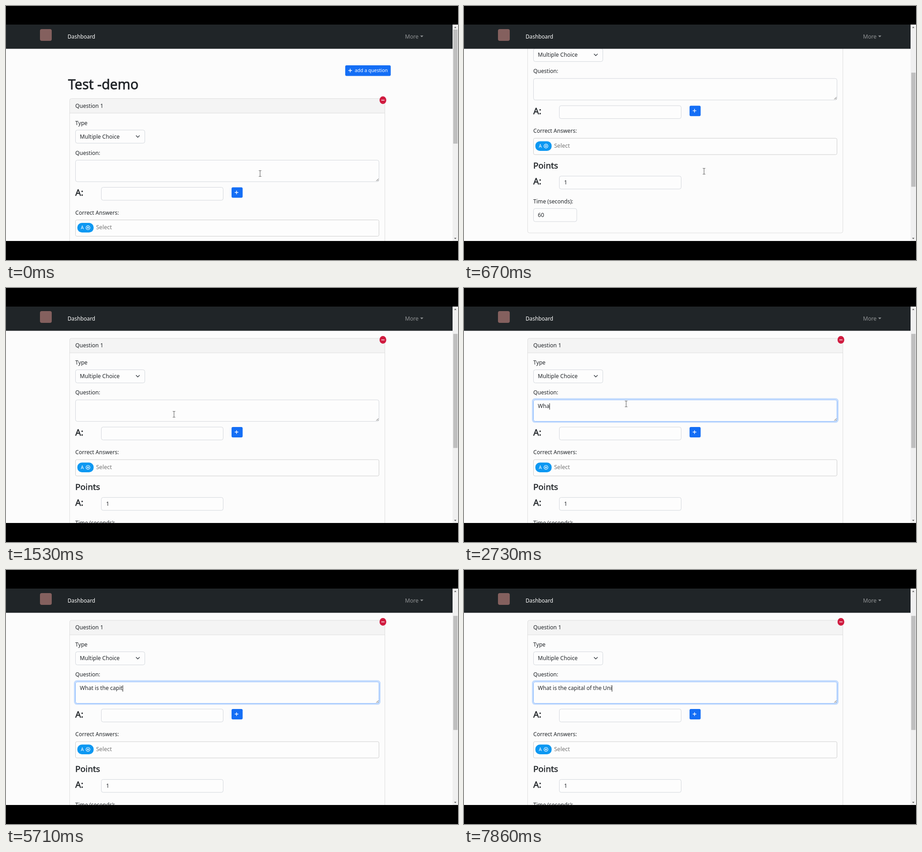
Animation, 998 px wide and 561 px high, one loop 8000 ms. Source, as an HTML page:

```html
<!DOCTYPE html>
<html lang="en">
<head>
<meta charset="utf-8">
<title>Question editor</title>
<style>
  html, body { margin: 0; height: 100%; overflow: hidden; background: #000; }
  svg { display: block; width: 100%; height: 100%; }
  text { font: 12.1px "Noto Sans", "Open Sans", sans-serif; fill: #212529; white-space: pre; }
  .title { font-size: 30px; stroke: #212529; stroke-width: .75; }
  .heading { font-size: 18.7px; stroke: #212529; stroke-width: .5; }
  .letter { font-size: 19.5px; stroke: #212529; stroke-width: .55; }
  .field { fill: #fdfdfd; stroke: #d3d7dc; }
  .blue { fill: #146ef5; }
  .icon { fill: none; stroke: #fff; stroke-width: 1.4; }
</style>
</head>
<body>
<svg viewBox="0 0 998 561">
  <defs>
    <clipPath id="view"><path d="M0 94H986V519H0z"/></clipPath>
  </defs>
  <rect width="998" height="561"/>
  <rect y="41" width="998" height="478" fill="#fcfcfc"/>

  <g clip-path="url(#view)">
    <g id="page">
      <rect class="blue" x="749" y="131" width="100.5" height="23.5" rx="3"/>
      <path class="icon" d="M756 142.5h8M760 138.5v8"/>
      <text x="770" y="146.4" style="font-size:10.45px;fill:#fff">add a question</text>
      <text class="title" x="137" y="183.5">Test -demo</text>

      <path d="M140.5 236.5V208.5q0-4 4-4H832.5q4 0 4 4V236.5z" fill="#f4f4f4"/>
      <path d="M140.5 236.5H836.5" stroke="#dedede"/>
      <rect x="140.5" y="204.5" width="696" height="477" rx="4" fill="none" stroke="#dedede"/>
      <text x="153" y="224.5">Question 1</text>
      <ellipse cx="832.2" cy="208" rx="7.5" ry="8.5" fill="#d01c40"/>
      <path class="icon" d="M828.7 208h7"/>

      <text x="153" y="262.5">Type</text>
      <rect class="field" x="153.5" y="274" width="153" height="29" rx="4"/>
      <text x="163" y="292.5">Multiple Choice</text>
      <path d="M287 286l4 4 4-4" fill="none" stroke="#343a40" stroke-width="1.4"/>

      <text x="153" y="328.7">Question:</text>
      <rect id="ring" x="151.5" y="338.5" width="674" height="51" rx="5" fill="none" stroke="#c2dbfe" stroke-width="3"/>
      <rect id="area" class="field" x="153.5" y="340.5" width="670" height="47.5" rx="4"/>
      <path d="M817.5 386.5l5-5M820.5 386.5l2-2" stroke="#555"/>
      <text id="typed" x="163" y="358.8"></text>
      <rect id="caret" y="348" width="1" height="14" fill="#111"/>

      <text class="letter" x="153" y="419">A:</text>
      <rect class="field" x="210.5" y="400.5" width="269" height="28.5" rx="4"/>
      <rect class="blue" x="498" y="400.5" width="24.5" height="23" rx="3"/>
      <path class="icon" d="M505 411.7h8M509 407.7v8"/>

      <text x="153" y="460.8">Correct Answers:</text>
      <rect class="field" x="153.5" y="472.5" width="670" height="36" rx="3" style="stroke:#cecece"/>
      <rect x="157.5" y="479" width="36" height="21.3" rx="10" fill="#0d98f2"/>
      <text x="165.3" y="493.4" style="font-size:10px;fill:#fff">A</text>
      <circle class="icon" cx="181" cy="489.7" r="4.3" style="stroke-width:1.2"/>
      <path class="icon" d="M179.3 488l3.4 3.4M182.7 488l-3.4 3.4" style="stroke-width:1.2"/>
      <text x="199" y="493.3" style="font-size:12.5px;fill:#757575">Select</text>

      <text class="heading" x="153" y="539">Points</text>
      <text class="letter" x="153" y="574.3">A:</text>
      <rect class="field" x="210.5" y="556" width="269" height="28.5" rx="4"/>
      <text x="221" y="574.5">1</text>
      <text x="153" y="616.2">Time (seconds):</text>
      <rect class="field" x="153.5" y="627.7" width="95.5" height="28.8" rx="4"/>
      <text x="163" y="646.3">60</text>
    </g>
  </g>

  <rect y="41" width="986" height="53.5" fill="#202528"/>
  <rect x="75" y="51" width="26" height="26" rx="4" fill="#84605e"/>
  <text x="136" y="71.5" style="font-size:11.8px;fill:#fff">Dashboard</text>
  <text x="881" y="71.5" style="fill:#909395">More</text>
  <path d="M914.5 65.3h7l-3.5 3.6z" fill="#909395"/>

  <rect x="986" y="41" width="12" height="478" fill="#f0f0f0"/>
  <path d="M989.5 48.5h5l-2.5-3zM989.5 512h5l-2.5 3z" fill="#606060"/>
  <rect id="thumb" x="987.5" width="9.5" height="252" fill="#bfbfbf"/>

  <g id="pointer">
    <path id="beam" d="M-2.7-6.5H-.7Q0-6.5 0-5.5V5.5Q0 6.5-.7 6.5H-2.7M2.7-6.5H.7Q0-6.5 0-5.5M0 5.5Q0 6.5.7 6.5H2.7" fill="none" stroke="#555"/>
    <path id="arrow" d="M-2-6.5V4.8L.6 2.4 2.4 6.8 4.4 6 2.6 1.7H6z" stroke="#fff" stroke-width=".6"/>
  </g>
</svg>
<script>
const LOOP = 8000;
const SENTENCE = "What is the capital of the Uni";
// Moment at which each character of the sentence appears
const KEY_TIMES = [
  2410, 2630, 2730, 2820, 2930, 3170, 3440, 3590, 3680, 3760,
  3900, 4360, 4540, 4670, 5260, 5440, 5710, 5810, 5920, 6020,
  6160, 6270, 6370, 6970, 7040, 7220, 7290, 7560, 7720, 7860];
// [time, x, y]
const POINTER_PATH = [
  [40, 561, 370], [200, 548, 368], [500, 548, 368], [670, 530, 365],
  [900, 530, 365], [1220, 420, 330], [1320, 408, 318], [1530, 371, 279],
  [1860, 358, 256]];
const WHEEL_STEP = 93.4, THUMB_RATIO = 0.528;

const [page, ring, area, typed, caret, thumb, pointer, beam, arrow] =
  ["page", "ring", "area", "typed", "caret", "thumb", "pointer", "beam", "arrow"]
    .map(id => document.getElementById(id));

const progress = (t, from, to) => Math.min(1, Math.max(0, (t - from) / (to - from)));
const smooth = u => u * u * (3 - 2 * u);
const show = (node, visible) => node.setAttribute("visibility", visible ? "visible" : "hidden");

function pointerAt(t) {
  let [, x, y] = POINTER_PATH[0];
  for (let i = 1; i < POINTER_PATH.length; i++) {
    const [from, x0, y0] = POINTER_PATH[i - 1], [to, x1, y1] = POINTER_PATH[i];
    if (t < from) break;
    const u = progress(t, from, to);
    x = x0 + (x1 - x0) * u;
    y = y0 + (y1 - y0) * u;
  }
  return [x, y];
}

function draw(t) {
  const scroll = WHEEL_STEP * (2 * smooth(progress(t, 480, 695)) - smooth(progress(t, 1142, 1362)));
  page.setAttribute("transform", `translate(0 ${-scroll})`);
  thumb.setAttribute("y", 52 + scroll * THUMB_RATIO);

  const focus = progress(t, 1890, 2040);
  ring.setAttribute("opacity", focus);
  area.style.stroke = focus > 0.5 ? "#86b7fe" : "";

  typed.textContent = SENTENCE.slice(0, KEY_TIMES.filter(k => k <= t).length);
  caret.setAttribute("x", 163 + typed.getComputedTextLength());
  show(caret, focus > 0);

  const overList = t >= 710 && t < 1420, pointing = t < 2930;
  pointer.setAttribute("transform", `translate(${pointerAt(t)})`);
  show(beam, pointing && !overList);
  show(arrow, pointing && overList);
}

const start = performance.now();
function tick() {
  draw((performance.now() - start) % LOOP);
  requestAnimationFrame(tick);
}
tick();
</script>
</body>
</html>
```
